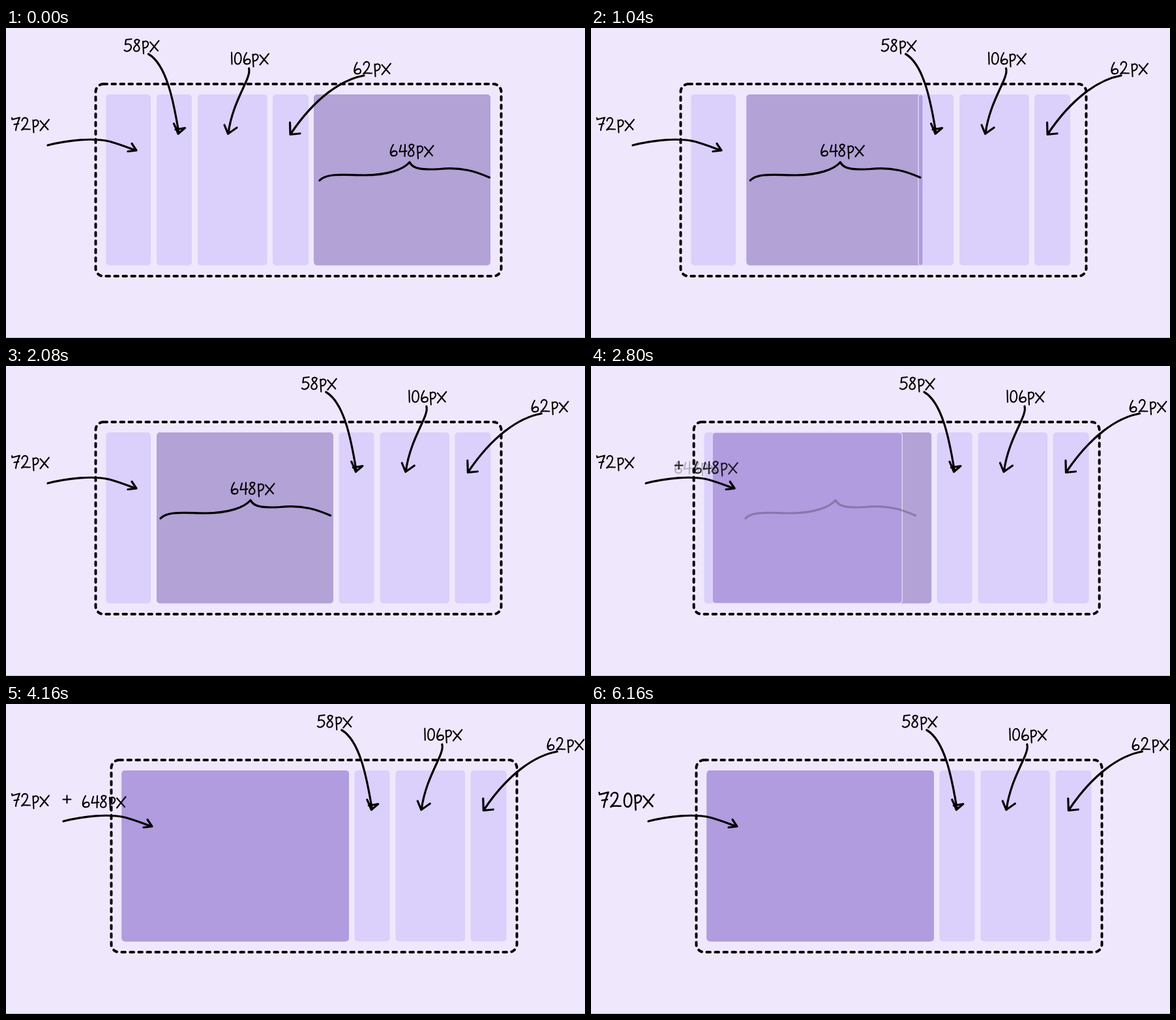
An HTML page for the animation above (6.8 s loop, 888 px wide and 476 px high).

```html
<!DOCTYPE html>
<html lang="en">
<head>
<meta charset="utf-8">
<title>Column widths</title>
<style>
  html, body { margin: 0; width: 100%; height: 100%; overflow: hidden; background: #efe7fc; }
  svg { display: block; width: 888px; height: 476px; }
  .ink { fill: none; stroke: #000; stroke-linecap: round; stroke-linejoin: round; }
  .arrow { stroke-width: 3.2; }
  .pen { stroke-width: 2.1; }
  /* selectable text beneath the hand lettering */
  text { font: 20px "Open Sans", sans-serif; fill: transparent; stroke: none; }
</style>
</head>
<body>
<svg id="stage" viewBox="0 0 888 476">
  <rect width="888" height="476" fill="#efe7fc"/>
  <rect y="475" width="888" height="1" fill="#bbb4c6"/>
</svg>
<script>
const LOOP = 6800, STEP = 80;
const TOP = 102, HEIGHT = 262.5;
const LIGHT = '#dad0fb', GREY = '#b2a2d6', VIVID = '#b09cde';

// Pen strokes per character: [advance, path], baseline at y = 0
const GLYPHS = {
  '0': [14, 'M5.5 -18C0 -17.5 -1 -1 5 -.5C12.5 0 12.5 -18.5 5.5 -18Z'],
  '1': [5, 'M1 -18.5L1.5 -.5'],
  '2': [17.5, 'M1.5 -14.5C2 -20.5 11 -21 10 -14C9 -8.5 4.5 -4 1 -.5C5 -3 9 -1 14 -1.5'],
  '4': [13.5, 'M3.5 -17C2.5 -13 1.5 -10 1 -7L12 -8M9.5 -18L9 0'],
  '5': [14, 'M11.5 -19L3 -18L2 -10.5C8 -13.5 12.5 -9 10.5 -4.5C8.5 0 3 1 .5 -2'],
  '6': [13.5, 'M5 -18C2 -13 0 -8 1 -3.5C3 1 10.5 0 10.5 -5C10.5 -9.5 4 -9 1.5 -4.5'],
  '7': [14.5, 'M.5 -19L1 -16.5L12.5 -19.5C10 -13 7 -6 6.5 0M4 -9L11 -10'],
  '8': [14, 'M9.5 -17C5.5 -20 1 -17.5 3 -13.5C5 -10 10.5 -8.5 9.5 -4C8.5 1 1 1 1 -4C1 -9 9 -11 9.5 -17'],
  'p': [11, 'M1 -15.5L2 3.5M1 -13C4 -18 10 -15.5 9 -10.5C8 -6.5 4.5 -5 2 -6'],
  'x': [16, 'M1 -14.5L13 -1M14.5 -16.5L1 .5'],
  '+': [17, 'M.5 -12.5H12.5M6.5 -18.5V-7'],
  ' ': [13, '']
};

const stage = document.getElementById('stage');

function add(name, attrs = {}, parent = stage) {
  const el = document.createElementNS('http://www.w3.org/2000/svg', name);
  set(el, attrs);
  parent.appendChild(el);
  return el;
}

function set(el, attrs) {
  for (const key in attrs) el.setAttribute(key, attrs[key]);
}

function label(str) {
  const g = add('g', { class: 'ink pen' });
  add('text', {}, g).textContent = str;
  let x = 0;
  for (const ch of str) {
    const [advance, d] = GLYPHS[ch];
    if (d) add('path', { d, transform: `translate(${x})` }, g);
    x += advance;
  }
  return g;
}

const ink = d => add('path', { d, class: 'ink arrow' });
const bar = fill => add('rect', { y: TOP, height: HEIGHT, rx: 5, fill });
const move = (el, x, y = 0, scale = 1) =>
  set(el, { transform: `translate(${x} ${y}) scale(${scale})` });
const fade = (el, opacity) => set(el, { opacity: clamp(opacity) });
const clamp = v => Math.min(1, Math.max(0, v));
const lerp = (a, b, p) => a + (b - a) * p;

function span(el, [a, b]) {
  set(el, { x: a, width: Math.max(0, b - a) });
}

// Gently underdamped spring, about 3% overshoot
function spring(ms) {
  if (ms <= 0) return 0;
  if (ms > 1150) return 1;
  const zeta = 0.75, w = 10.3 * ms / 1000, k = Math.sqrt(1 - zeta * zeta);
  return 1 - Math.exp(-zeta * w) * (Math.cos(k * w) + zeta / k * Math.sin(k * w));
}

const easeOut = u => 1 - (1 - clamp(u)) ** 3;

const columns = [[153.5, 222], [231, 285], [294, 400.5], [409, 464]];
const panels = columns.map(() => bar(LIGHT));
const block = bar(GREY);
const overlaps = columns.map(() => bar(VIVID));
overlaps.forEach(el => set(el, { stroke: '#e6dcfc' }));

const frame = add('rect', {
  class: 'ink', x: 137.5, y: 86, width: 622, height: 295, rx: 12,
  'stroke-width': 4, 'stroke-dasharray': '5.5 7.5'
});

const firstArrow = ink('M64 180C95 172 134 168 160 174.5C176 179 188 184 199 188M193 177.5L200 188L187 189.5');
const brace = ink('M481 234C492 222 520 226 550 226C585 226 610 217 619 206C624 217 640 218 665 216.5C700 213 722 221 741.5 229.5');

// Callouts that travel with the three right-hand columns
const callouts = [
  ['58px', 181, 36, 'M218.500 40C246 56 257 112 265 161M257.500 147C260 152 262 157 264 162.500L274.500 153.500L260 156'],
  ['106px', 345, 56, 'M372.500 62C377 77 348 110 341 161M335 149L340.500 162.500L354 153'],
  ['62px', 533.5, 71, 'M549 73C515 79 474 107 437 162M435.500 145L436 163.500L451 162']
].map(([str, x, y, d]) => ({ text: label(str), arrow: ink(d), x, y }));

const first = label('72px');
const wide = label('648px');
const plus = label('+ 648px');
const total = label('720px');

function render(t) {
  const swap = spring(t - 720);
  const merge = spring(t - 2557);
  const sum = easeOut((t - 4340) / 440);
  const shift = 24 * merge;
  const merged = t >= 3600;

  const blockSpan = [
    lerp(472, 231, swap) - 53.5 * merge,
    lerp(743, 502, swap) + shift
  ];
  span(block, blockSpan);
  columns.forEach(([a, b], i) => {
    const dx = (i ? 279.5 * swap : 0) + shift;
    const s = [a + dx, b + dx + (i ? 0 : 280 * merge)];
    span(panels[i], s);
    const cut = [Math.max(s[0], blockSpan[0]), Math.min(s[1], blockSpan[1])];
    span(overlaps[i], cut);
    set(overlaps[i], {
      visibility: cut[1] - cut[0] > 0.5 ? 'visible' : 'hidden',
      'stroke-width': merged ? 0 : 1.3,
      rx: Math.min(5, Math.max(0, cut[1] - cut[0]) / 2)
    });
  });

  move(frame, shift);
  move(firstArrow, shift);
  callouts.forEach(c => {
    const dx = 272.3 * swap + shift;
    move(c.text, c.x + dx, c.y);
    move(c.arrow, dx);
  });

  // The wide label turns into an addend while its brace dissolves
  const gone = clamp(1 - merge) ** 0.8;
  const wideX = lerp(lerp(589, 345, swap), 87, merge);
  const wideY = lerp(197, 159, merge);
  move(brace, -244 * swap);
  fade(brace, merged ? 0 : gone);
  move(wide, wideX, wideY);
  fade(wide, merged ? 0 : gone);
  move(plus, wideX, wideY);
  fade(plus, clamp(merge) * (1 - sum));

  // Addends dissolve into the larger total
  const x = lerp(8.5, 12, sum), y = lerp(157, 158.5, sum);
  move(first, x, y, lerp(1, 1.18, sum));
  fade(first, 1 - sum);
  move(total, x, y, lerp(1, 1.18, sum));
  set(total, { 'stroke-width': 2.4 });
  fade(total, sum);
}

const start = performance.now();
function tick() {
  const t = (performance.now() - start) % LOOP;
  render(Math.floor(t / STEP) * STEP);
  requestAnimationFrame(tick);
}
tick();
</script>
</body>
</html>
```
